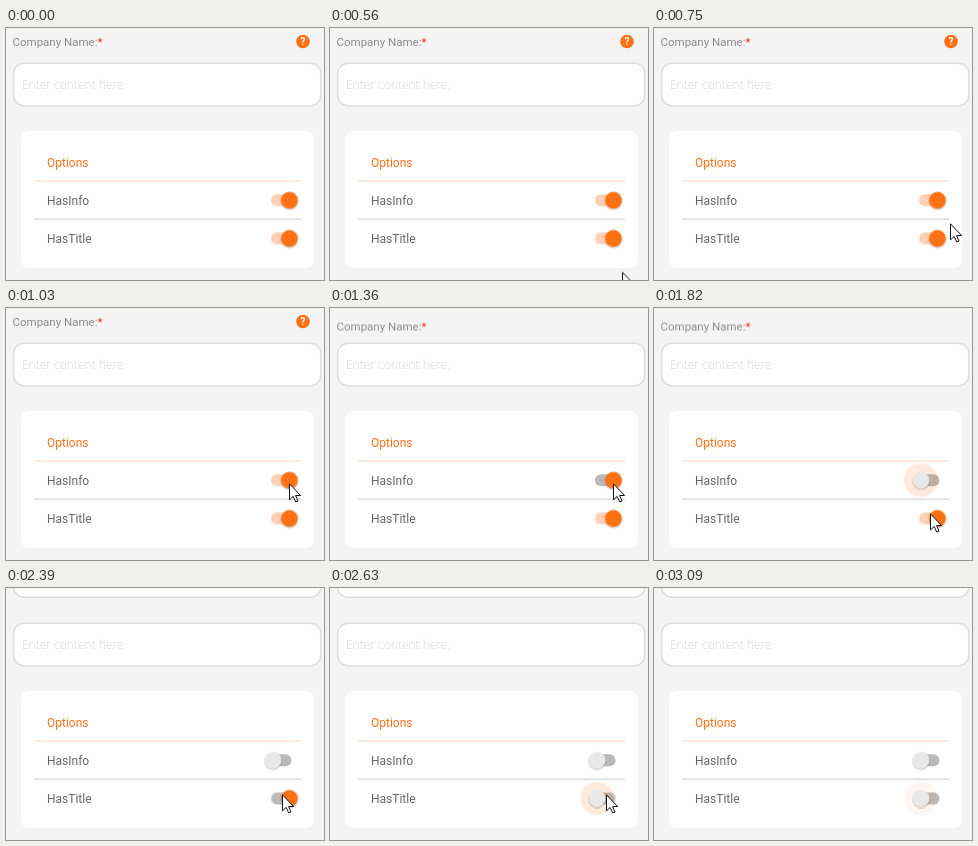
Write an HTML page that moves like this. It is 318 px wide and 252 px high and loops after 3680 ms.

```html
<!DOCTYPE html>
<html lang="en">
<head>
<meta charset="utf-8">
<title>Form options</title>
<style>
  html, body { margin: 0; width: 100%; height: 100%; overflow: hidden; background: #f4f4f4; }
  svg { display: block; width: 318px; height: 252px; }
  text { font: 12px Roboto, sans-serif; fill: #666; }
  .label { font-size: 11.5px; fill: #8c8c8c; }
  .hint { font: 300 12px "Open Sans", sans-serif; fill: #d6d6d6; }
  .accent { fill: #fd7014; }
  .field { fill: #fefefe; stroke: #dedede; stroke-width: 1.5; }

  .heading, .help, .above, .cursor, .track, .knob, .slide, .wave, .core {
    animation: 3680ms linear infinite;
  }

  /* Form header */
  .heading { animation-name: heading; animation-timing-function: step-end; }
  .help { animation-name: help; animation-timing-function: step-end; }
  .above { animation-name: above; animation-timing-function: step-end; }
  @keyframes heading {
    0% { transform: none; opacity: 1; }
    35.598% { transform: translateY(4.5px); opacity: 1; }
    64.946%, 100% { transform: translateY(4.5px); opacity: 0; }
  }
  @keyframes help { 0% { opacity: 1; } 35.598%, 100% { opacity: 0; } }
  @keyframes above { 0% { opacity: 0; } 64.946%, 100% { opacity: 1; } }

  /* Switches */
  .track { fill: #fdd0b5; animation-timing-function: step-end; }
  .knob { fill: #fd7014; }
  .slide { animation-timing-function: ease-out; }
  .wave, .core { fill: #fd7014; opacity: 0; }

  .info .track { animation-name: track-info; }
  .info .knob { animation-name: knob-info; }
  .info .slide { animation-name: slide-info; }
  .info .wave { animation-name: wave-info; }
  .info .core { animation-name: core-info; }
  @keyframes track-info { 0% { fill: #fdd0b5; } 35.598%, 100% { fill: #b9b9b9; } }
  @keyframes knob-info { 0%, 37.228% { fill: #fd7014; } 38.587%, 100% { fill: #e8e8e8; } }
  @keyframes slide-info {
    0%, 37.228% { transform: none; }
    40.761% { transform: translateX(-15.5px); }
    42.391%, 100% { transform: translateX(-16.5px); }
  }
  @keyframes wave-info {
    0%, 37.228% { opacity: 0; transform: scale(.3); }
    40.761% { opacity: .16; transform: scale(1); }
    42.391%, 64.946% { opacity: .14; transform: scale(1); }
    64.947%, 100% { opacity: 0; transform: scale(1); }
  }
  @keyframes core-info {
    0%, 37.228% { opacity: 0; transform: scale(.2); }
    40.761% { opacity: .16; transform: scale(.8); }
    42.935%, 100% { opacity: 0; transform: scale(1); }
  }

  .title .track { animation-name: track-title; }
  .title .knob { animation-name: knob-title; }
  .title .slide { animation-name: slide-title; }
  .title .wave { animation-name: wave-title; }
  .title .core { animation-name: core-title; }
  @keyframes track-title { 0% { fill: #fdd0b5; } 64.946%, 100% { fill: #b9b9b9; } }
  @keyframes knob-title { 0%, 66.576% { fill: #fd7014; } 67.935%, 100% { fill: #e8e8e8; } }
  @keyframes slide-title {
    0%, 66.576% { transform: none; }
    70.109% { transform: translateX(-15.5px); }
    71.467%, 100% { transform: translateX(-16.5px); }
  }
  @keyframes wave-title {
    0%, 66.576% { opacity: 0; transform: scale(.3); }
    70.109% { opacity: .16; transform: scale(1); }
    71.467%, 83.966% { opacity: .14; transform: scale(1); }
    83.967%, 100% { opacity: .06; transform: scale(1); }
  }
  @keyframes core-title {
    0%, 66.576% { opacity: 0; transform: scale(.2); }
    70.109% { opacity: .16; transform: scale(.8); }
    71.467%, 100% { opacity: 0; transform: scale(1); }
  }

  /* Pointer */
  .cursor { animation-name: cursor; fill: #fff; stroke: #111; }
  @keyframes cursor {
    0%, 15.216% { opacity: 0; transform: translate(292px, 244px); }
    15.217% { opacity: 1; transform: translate(292px, 244px); animation-timing-function: ease-out; }
    20.38%, 21.6% { transform: translate(296px, 195px); animation-timing-function: ease-out; }
    27.989%, 43.478% { transform: translate(283px, 175px); animation-timing-function: ease-in-out; }
    49.457% { transform: translate(276px, 205px); }
    52.174%, 77.446% { transform: translate(276px, 206px); }
    77.717% { transform: translate(268px, 211px); }
    80.162% { opacity: 1; transform: translate(234px, 230px); }
    80.163%, 100% { opacity: 0; transform: translate(234px, 230px); }
  }
</style>
</head>
<body>
<svg viewBox="0 0 318 252">
  <defs>
    <g id="shadow"><circle cy="1" r="8.8" fill="#000" opacity=".17"/></g>
  </defs>

  <g class="heading">
    <text class="label" x="6.5" y="18">Company Name:<tspan fill="#f22">*</tspan></text>
  </g>
  <g class="help">
    <circle class="accent" cx="297" cy="13.5" r="6.8"/>
    <text x="297" y="17.2" text-anchor="middle" style="font-size:10px;font-weight:700;fill:#fff">?</text>
  </g>
  <rect class="field above" x="7.75" y="-33.25" width="307" height="42.5" rx="10"/>
  <rect class="field" x="7.75" y="35.25" width="307" height="42.5" rx="10"/>
  <text class="hint" x="16" y="61">Enter content here.</text>

  <rect x="15" y="103" width="293" height="137" rx="8" fill="#fefefe"/>
  <text class="accent" x="41" y="139">Options</text>
  <path d="M28 153H295" stroke="#fde3d5" stroke-width="1.5"/>
  <text x="41" y="177">HasInfo</text>
  <path d="M28 191.3H295" stroke="#dcdcdc" stroke-width="1.5"/>
  <text x="41" y="215">HasTitle</text>

  <g class="info" transform="translate(283.5 172.3)">
    <rect class="track" x="-18.5" y="-6" width="20.5" height="12" rx="6"/>
    <g class="slide">
      <circle class="wave" r="16.8"/>
      <circle class="core" r="16.8"/>
      <use href="#shadow"/>
      <circle class="knob" r="8.4"/>
    </g>
  </g>
  <g class="title" transform="translate(283.5 210.5)">
    <rect class="track" x="-18.5" y="-6" width="20.5" height="12" rx="6"/>
    <g class="slide">
      <circle class="wave" r="16.5"/>
      <circle class="core" r="16.5"/>
      <use href="#shadow"/>
      <circle class="knob" r="8.4"/>
    </g>
  </g>

  <path class="cursor" d="M.5 .8V16.8L4.2 13.4L6.7 19L9 18L6.6 12.5H11.6Z"/>
</svg>
</body>
</html>
```
